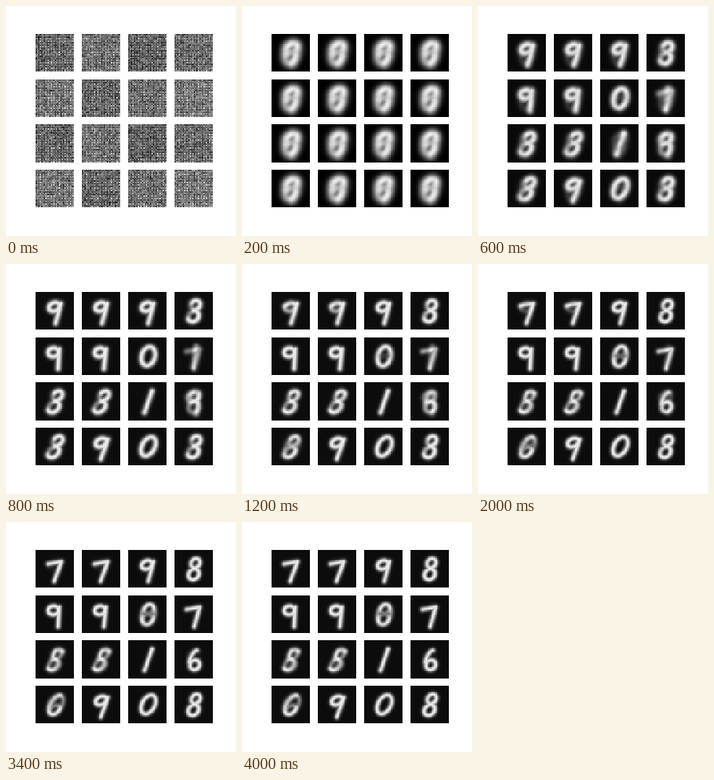
Recreate the animation shown at these times as an HTML page with a canvas. Size 288 px wide and 288 px high, loop 4.2 s.

```html
<!DOCTYPE html>
<html lang="en">
<head>
<meta charset="utf-8">
<title>Digits emerging from noise</title>
<style>
html, body { margin: 0; width: 100%; height: 100%; overflow: hidden; background: #fff; }
canvas { display: block; }
</style>
</head>
<body>
<canvas id="stage" width="288" height="288"></canvas>
<script>
const LOOP = 4200, STEP = 200, N = 28, UNIT = 48, PEAK = 238;
const ctx = document.getElementById('stage').getContext('2d');
const cell = document.createElement('canvas');
cell.width = cell.height = N;
const cellCtx = cell.getContext('2d');
const pixels = cellCtx.createImageData(N, N);

// Strokes are point lists in a 48 unit square; angles are in turns, clockwise from the right.
const line = (...n) => [[n[0], n[1]], [n[2], n[3]]];
const arc = (cx, cy, rx, ry, from = 0, to = 1) => Array.from({ length: 25 }, (_, i) => {
  const a = 2 * Math.PI * (from + (to - from) * i / 24);
  return [cx + rx * Math.cos(a), cy + ry * Math.sin(a)];
});

const digits = {
  0: [arc(25, 24, 8.5, 12)],
  1: [line(25, 11, 25, 38)],
  3: [arc(25, 17, 6, 6, -.4, .25), arc(24, 31, 7, 7, -.25, .4)],
  5: [line(31, 14, 22, 14), line(22, 14, 20, 23), arc(22, 30, 6, 7, -.3, .35)],
  6: [arc(26, 31, 6, 6), arc(30, 28, 11, 16, .5, .7)],
  7: [line(14, 18, 30, 15), line(30, 15, 27, 40)],
  8: [arc(25, 17, 5.5, 6), arc(25, 31, 6.5, 7)],
  9: [arc(22, 19, 6.5, 5.5), line(29, 15, 29, 40)]
};

// Digits mixed early, digits mixed late, slant
const tiles = [
  '9 7 .25', '9 7 .25', '9 9 .25', '83 8 .15',
  '9 9 .05', '9 9 .1', '0 08 .15', '17 7 .15',
  '83 58 .3', '83 58 .35', '1 1 .35', '98 6 .1',
  '83 60 .35', '9 9 .35', '0 0 .3', '83 8 .2'
].map(s => s.split(' '));

function segmentDist2(x, y, [ax, ay], [bx, by]) {
  const dx = bx - ax, dy = by - ay;
  const u = Math.max(0, Math.min(1, ((x - ax) * dx + (y - ay) * dy) / (dx * dx + dy * dy)));
  return (x - ax - u * dx) ** 2 + (y - ay - u * dy) ** 2;
}

// Squared distance from each cell pixel to the nearest stroke of a slanted digit
const maps = {};
function distances(digit, slant) {
  const lean = ([x, y]) => [x + slant * (25 - y), y];
  const strokes = digits[digit].map(s => s.map(lean));
  return maps[digit + slant] ??= Float32Array.from({ length: N * N }, (_, i) => {
    const x = (i % N + .5) * UNIT / N, y = (Math.floor(i / N) + .5) * UNIT / N;
    let best = Infinity;
    for (const s of strokes)
      for (let j = 1; j < s.length; j++)
        best = Math.min(best, segmentDist2(x, y, s[j - 1], s[j]));
    return best;
  });
}

function random(seed) {
  return () => {
    seed = (seed * 1664525 + 1013904223) >>> 0;
    return seed / 4294967296;
  };
}

function noise(index) {
  const rnd = random(index * 977 + 31);
  const grey = 95 + 25 * rnd();
  return Array.from({ length: N * N }, (_, i) => {
    const dot = i % 2 && Math.floor(i / N) % 2;
    return grey + (dot ? 45 : -10) + (rnd() + rnd() - 1) * 65;
  });
}

function picture([early, late, slant], t) {
  const s = Math.min(1, (t - 200) / 600);
  const blur = 1 - s * s * (3 - 2 * s);
  const settled = t < 800 ? 0 : 1 - Math.exp((800 - t) / 900);
  const spread = 2.6 + 1.8 * blur - .4 * settled;
  const sum = new Float32Array(N * N);

  function add(mix, lean, weight) {
    for (const d of mix)
      distances(d, lean).forEach((v, i) => {
        sum[i] += weight / mix.length * Math.exp(-v / (2 * spread * spread));
      });
  }
  add('089', .2, blur);
  add(early, +slant, (1 - blur) * (1 - settled));
  add(late, +slant, (1 - blur) * settled);

  // Each cell is scaled to its own brightest pixel.
  const back = 12 * (1 - blur), gain = (PEAK - back) / Math.max(...sum);
  return Array.from(sum, v => back + v * gain);
}

function draw(t) {
  ctx.fillStyle = '#fff';
  ctx.fillRect(0, 0, 288, 288);
  ctx.imageSmoothingEnabled = false;
  tiles.forEach((tile, index) => {
    const greys = t < STEP ? noise(index) : picture(tile, t);
    greys.forEach((g, i) => {
      pixels.data.fill(g, i * 4, i * 4 + 3);
      pixels.data[i * 4 + 3] = 255;
    });
    cellCtx.putImageData(pixels, 0, 0);
    const top = 34.8 + Math.floor(index / 4) * 56.7;
    const y = Math.round(top), bottom = Math.round(top + 47.4);
    ctx.drawImage(cell, 37 + index % 4 * 58, y, UNIT, bottom - y);
  });
}

let shown = -1;
function tick() {
  const t = Math.floor(performance.now() % LOOP / STEP) * STEP;
  if (t !== shown) draw(shown = t);
  requestAnimationFrame(tick);
}
tick();
</script>
</body>
</html>
```
